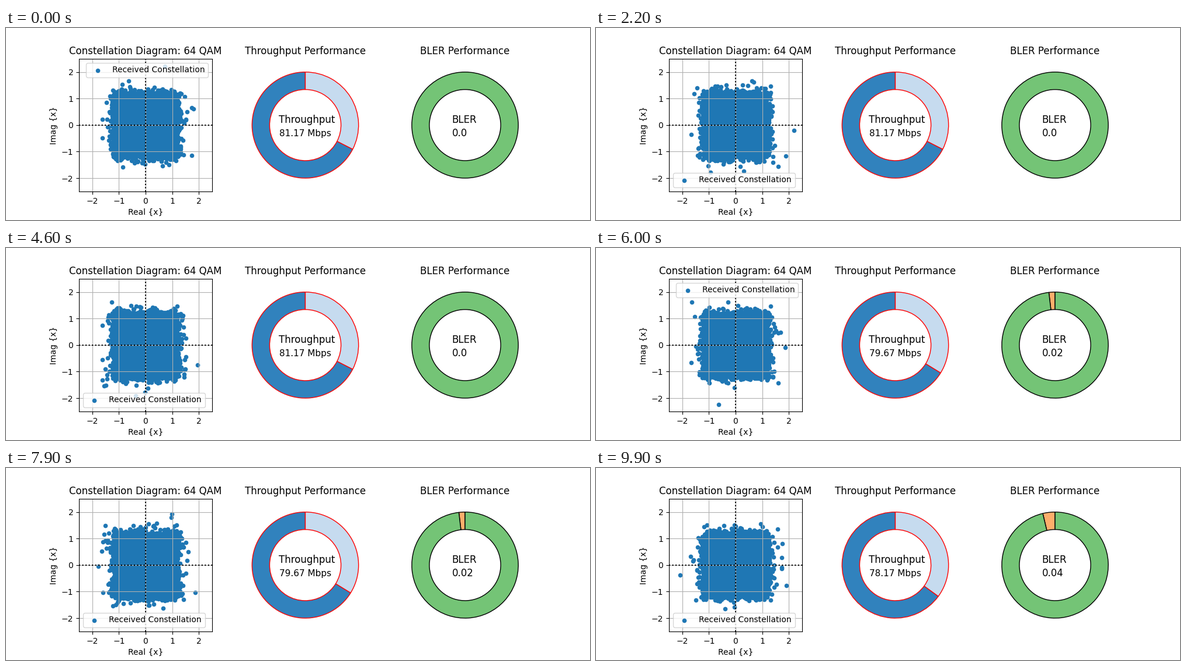
These frames come from a looping animation (1000x330 px, 10 s). A matplotlib script:

```python
import numpy as np
import matplotlib.pyplot as plt
from matplotlib.animation import FuncAnimation
from matplotlib.patches import Wedge

FRAMES, INTERVAL = 100, 100
PEAK, CAPACITY, BLOCKS = 81.173, 120.3, 54
LEVELS = np.arange(-7, 8, 2) / np.sqrt(42)


def symbols(i, count=6500, sigma=.075, df=3.5):
    """Noisy 64 QAM symbols; fading gives the noise a heavy tail."""
    rng = np.random.default_rng(100 + i)
    fading = np.sqrt(df / rng.chisquare(df, (count, 1)))
    noise = sigma * fading * rng.normal(size=(count, 2))
    return rng.choice(LEVELS, (count, 2)) + noise


def lost_blocks(i):
    """Losses grow slowly over the loop and flicker by one block."""
    flicker = (i % 7 == 3) - (i % 7 == 5)
    return max(0, (i + 1) // 50 + flicker)


def legend_place(i):
    return "upper right" if i % 5 in (0, 3) else "lower left"


def ring(ax, title, colors, edge):
    ax.set(xlim=(-1.25, 1.25), ylim=(-1.25, 1.25), aspect="equal")
    ax.axis("off")
    ax.set_title(title)
    return [ax.add_patch(Wedge((0, 0), 1, 90, 450, width=.33, facecolor=c,
                               edgecolor=edge, linewidth=1)) for c in colors]


def split(wedges, share):
    """Give the first wedge its share, counter-clockwise from the top."""
    cut = 90 + 360 * share
    wedges[0].set_theta2(cut)
    wedges[0].set_visible(share > 0)
    wedges[1].set_theta1(cut)


fig, (ax, ax_tp, ax_bl) = plt.subplots(1, 3, figsize=(10, 3.3), dpi=100)
fig.subplots_adjust(bottom=.1094, top=.8794)

dots = ax.scatter([], [], s=20, color="tab:blue", label="Received Constellation")
ax.axhline(0, color="black", ls=":")
ax.axvline(0, color="black", ls=":")
ax.set(xlim=(-2.5, 2.5), ylim=(-2.5, 2.5), aspect="equal",
       xticks=range(-2, 3), yticks=range(-2, 3),
       xlabel="Real {x}", ylabel="Imag {x}",
       title="Constellation Diagram: 64 QAM")
ax.grid(True)

tp_ring = ring(ax_tp, "Throughput Performance", ["#3182bd", "#c6dbef"], "red")
ax_tp.text(-.5, .04, "Throughput", fontsize=12)
tp_text = ax_tp.text(-.49, -.21, "", fontsize=11)

bl_ring = ring(ax_bl, "BLER Performance", ["#fdae6b", "#74c476"], "black")
ax_bl.text(-.25, .04, "BLER", fontsize=12)
bl_text = ax_bl.text(-.24, -.21, "", fontsize=12)


def update(i):
    bler = lost_blocks(i) / BLOCKS
    rate = PEAK * (1 - bler)
    dots.set_offsets(symbols(i))
    ax.legend(loc=legend_place(i))
    split(tp_ring, rate / CAPACITY)
    split(bl_ring, bler)
    tp_text.set_text(f"{rate:.2f} Mbps")
    bl_text.set_text(str(round(bler, 2)))
    return [dots, *tp_ring, *bl_ring, tp_text, bl_text]


anim = FuncAnimation(fig, update, frames=FRAMES, interval=INTERVAL,
                     repeat=True, repeat_delay=0, blit=False)
plt.show()
```
